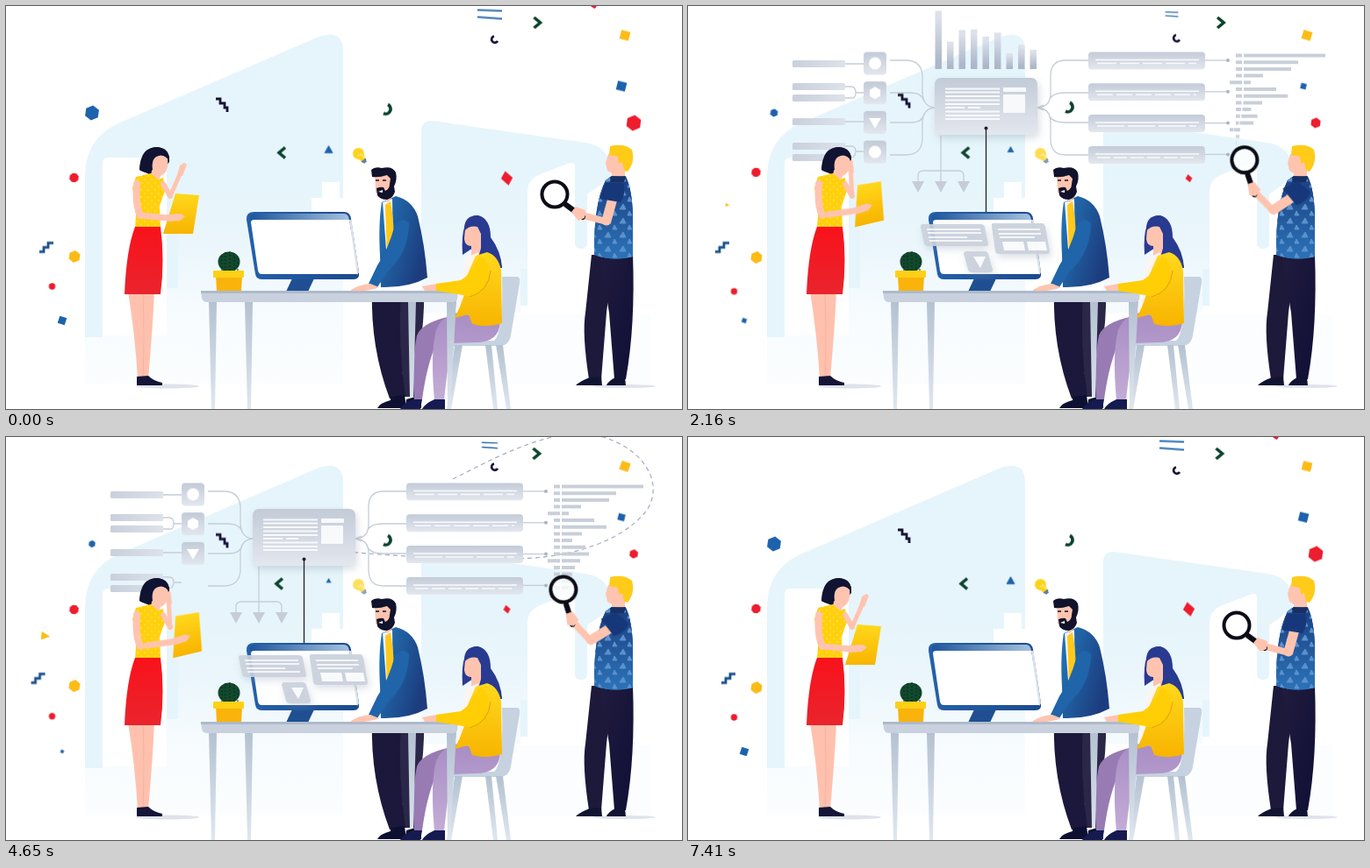
An HTML page for the animation above (7.44 s loop, 770 by 460 pixels).

```html
<!DOCTYPE html>
<html lang="en">
<head>
<meta charset="utf-8">
<title>Team at work</title>
<style>
html,body{margin:0;width:100%;height:100%;overflow:hidden;background:#fff}
svg{display:block;width:770px;height:460px}
.link{fill:none;stroke:#c6cdd8;stroke-width:1.3}
.skin{fill:#ffc4b0}
.limb{fill:none;stroke:#ffc4b0;stroke-linecap:round;stroke-linejoin:round}
.mark{fill:none;stroke-linejoin:miter}
[data-on]{transform-box:fill-box;transform-origin:center}
[data-on$=wide]{transform-origin:left}
[data-on$=tall]{transform-origin:top}
[data-on$=rise]{transform-origin:bottom}
.bar{transform-origin:0 72px}
#plane{offset-path:path("M509 48C560 22 630 -16 680 0C732 16 750 58 728 86C700 120 640 140 570 139C500 139 450 136 400 132C300 126 130 170 90 212C40 265 40 345 88 380C120 400 160 430 205 434C240 436 265 444 330 466L380 490");animation:fly 7440ms linear infinite}
@keyframes fly{0%,52.5%{offset-distance:0%;opacity:0}52.6%{opacity:1}73.6%{offset-distance:100%;opacity:1}73.7%,100%{offset-distance:100%;opacity:0}}
#reveal{stroke-dasharray:1 2;animation:draw 7440ms linear infinite}
@keyframes draw{0%,52.5%{stroke-dashoffset:1}73.6%,100%{stroke-dashoffset:0}}
#trail{animation:fade 7440ms linear infinite}
@keyframes fade{0%,52.5%{opacity:0}52.6%,75.5%{opacity:1}79.5%,100%{opacity:0}}
</style>
</head>
<body>
<svg viewBox="0 0 770 460" xmlns="http://www.w3.org/2000/svg">
<defs>
  <linearGradient id="wall" gradientUnits="userSpaceOnUse" x2="0" y1="200" y2="432"><stop stop-color="#e6f5fb"/><stop offset=".3" stop-color="#eaf6fc"/><stop offset=".7" stop-color="#f8fcfe"/><stop offset="1" stop-color="#fbfdfe"/></linearGradient>
  <linearGradient id="steel" x2="0" y2="1"><stop stop-color="#c3cbd8"/><stop offset="1" stop-color="#e3e7ee"/></linearGradient>
  <linearGradient id="pale" x2="1" y2="0"><stop stop-color="#c9d0dc"/><stop offset="1" stop-color="#dde2ea"/></linearGradient>
  <linearGradient id="col" x2="0" y2="1"><stop stop-color="#e3e7ee"/><stop offset="1" stop-color="#a6b1c5"/></linearGradient>
  <linearGradient id="leg" x2="0" y2="1"><stop stop-color="#b4c1d1"/><stop offset="1" stop-color="#dfe7ef"/></linearGradient>
  <linearGradient id="screen" x2="1" y2="0"><stop stop-color="#2461ab"/><stop offset="1" stop-color="#1c4a8c"/></linearGradient>
  <linearGradient id="glow" x2="1" y2="0"><stop stop-color="#1f559c"/><stop offset="1" stop-color="#a5c2df"/></linearGradient>
  <linearGradient id="coat" x2="1" y2=".5"><stop stop-color="#2377b8"/><stop offset="1" stop-color="#1c3c7e"/></linearGradient>
  <linearGradient id="gold" x2="0" y2="1"><stop stop-color="#ffd81c"/><stop offset="1" stop-color="#f8b400"/></linearGradient>
  <linearGradient id="red" x2="0" y2="1"><stop stop-color="#f9121b"/><stop offset="1" stop-color="#e9242d"/></linearGradient>
  <linearGradient id="navy" x2="1" y2="1"><stop stop-color="#201c3e"/><stop offset="1" stop-color="#100f36"/></linearGradient>
  <linearGradient id="plum" x2="0" y2="1"><stop stop-color="#a98dc4"/><stop offset="1" stop-color="#c2add6"/></linearGradient>
  <linearGradient id="shirt" x2="0" y2="1"><stop stop-color="#1b3f80"/><stop offset="1" stop-color="#2c73b8"/></linearGradient>
  <pattern id="dots" width="8" height="8" patternUnits="userSpaceOnUse"><rect width="8" height="8" fill="#ffd00c"/><circle cx="2" cy="2" r=".7" fill="#ffea90"/><circle cx="6" cy="6" r=".7" fill="#ffea90"/></pattern>
  <pattern id="tris" width="17" height="16" patternUnits="userSpaceOnUse"><path d="M2 8L6 2L9 8ZM11 15L13 10L16 15Z" fill="#5a92cd" stroke="#5a92cd" stroke-linejoin="round"/></pattern>
  <filter id="soft" x="-20%" y="-20%" width="140%" height="150%"><feDropShadow dy="4" stdDeviation="4" flood-color="#7f8da5" flood-opacity=".3"/></filter>
  <mask id="cut" maskUnits="userSpaceOnUse" x="0" y="-20" width="770" height="500"><path id="reveal" class="route" pathLength="1" fill="none" stroke="#fff" stroke-width="8"/></mask>
</defs>
<rect width="770" height="460" fill="#fff"/>

<!-- buildings and paper plane -->
<path d="M473 350V143Q473 130 486 131L660 156Q690 160 690 195L662 215V270Q662 277 655 277T648 270V184Q648 177 640 180L606 193Q594 199 594 212V342H586V350Z" fill="url(#wall)"/>
<path d="M586 300H594V342H586ZM648 215H662V270Q662 277 655 277T648 270Z" fill="#e6f5fb"/>
<path d="M574 352H735V432H574Z" fill="#fbfdfe"/>
<g mask="url(#cut)"><path id="trail" class="route" fill="none" stroke="#a9b1c6" stroke-width="1.3" stroke-dasharray="5 4"/></g>
<g id="plane"><path d="M-7 -11L32 5L-6 4Z" fill="#dde3ec"/><path d="M-2 4L32 5L6 13Z" fill="#e8edf3"/><path d="M-2 4L1 13L8 7L32 5Z" fill="#b7c1d0"/></g>
<path d="M90 432V195Q90 150 130 133L354 36Q384 25 384 52V432Z" fill="url(#wall)"/>
<path d="M110 376V180Q110 173 117 173H175Q183 173 183 181V376Z" fill="#fff"/>
<path d="M90 195H110V378H90ZM183 181H196V322H183Z" fill="#e6f5fb"/>
<path d="M348 236V219H360V201H380V219H385V236Z" fill="#fff"/>
<g data-on="1550 5450 fade" fill="url(#pale)" id="leftbars"><path class="link" d="M179 66H200M179 92H186Q191 92 191 99T186 105H179M191 99H200M179 132H200M179 160H186Q191 160 191 166T186 173H179M191 166H200"/></g>

<!-- desk equipment -->
<path d="M326 311H351L344 326H319Z" fill="#1f4f92"/>
<path d="M283 235H385Q392 235 393 243L402 304Q403 312 396 312H292Q285 312 284 306L274 244Q273 235 283 235Z" fill="url(#screen)"/>
<path d="M283 237H385Q390 237 391 244H278Q277 237 283 237Z" fill="url(#glow)"/>
<path d="M283 244H391L401 304Q401 306 398 306H291Q288 306 287 302L279 247Q279 244 283 244Z" fill="#fff"/>
<path d="M391 244H393.500L402 304L400 307Z" fill="#dce2ec"/>
<ellipse cx="254" cy="292" rx="12.500" ry="11.500" fill="#12492d"/>
<path d="M246 285V302M250 281V302M255 280V302M260 282V302M264 288V302" stroke="#06291c" stroke-dasharray="2 2"/>
<path d="M239 307H269L268 326H240Z" fill="#f9b30b"/><rect x="236" y="302" width="35" height="8" rx="1" fill="#ffd016"/>

<!-- standing man at the desk -->
<path d="M443 325H476Q477 362 470 396L466 446H454L443 338Z" fill="#2b2748"/>
<path d="M417 325H450Q446 385 455 446L437 448Q415 390 417 325Z" fill="#1b183b"/>
<path d="M423 459Q426 453 438 450L438 446L454 444L456 459ZM455 459L456 449L466 446L473 455V459Z" fill="#0d1030"/>
<path d="M428 224L444 217Q463 222 469 240Q477 272 480 310Q458 322 427 321L426 285Q424 248 428 224Z" fill="url(#coat)"/>
<path d="M429 224L440 220L441 275L434 292Z" fill="#f2f5fb"/><path d="M432 227L438 223Q444 260 440 275L434 287Z" fill="#ffc91b"/>
<path class="skin" d="M420 190H441V217L435 224L428 217L421 213Z"/>
<path d="M417 195L416 187Q420 183 428 185Q440 182 444 190Q446 198 442 206L443 212Q441 219 434 221Q426 221 423 216L422 208Q427 206 430 207L432 211Q437 209 437 203L438 197L434 193Q425 196 417 195Z" fill="#11122b"/>
<path d="M424 212L429 210L429 213Z" fill="#fff"/>
<path d="M421 199H425M429 199H433" stroke="#11122b" stroke-width="1.300"/>

<!-- chair and seated legs -->
<path d="M565 309H582Q586 309 585 316L575 376Q573 388 562 388H510V382H556Q567 372 565 309Z" fill="#c6d2e0"/>
<path d="M511 387H520L507 460H502ZM546 387H553L560 460H555ZM558 387H566L575 460H570Z" fill="url(#leg)"/>
<path d="M520 352Q475 358 468 376Q462 405 465 449H474Q480 405 492 382L530 375Z" fill="#977bb2"/>
<path d="M515 350L563 360Q562 384 535 384L508 385Q503 410 499 450H488Q483 395 490 370Q496 354 515 350Z" fill="url(#plum)"/>
<path d="M449 460Q452 454 464 449H474L472 460ZM474 460Q477 454 488 449H500V460Z" fill="#151b50"/>

<!-- table -->
<path d="M231 337H240L238 460H234ZM272 337H281L279 460H275ZM458 337H467L464 446H460ZM502 337H513L506 460H503Z" fill="url(#leg)"/>
<path d="M222 325H515L514 335Q513 338 509 338H229Q224 338 223 333Z" fill="#c8d1dd"/><path d="M222 325H515V328H222Z" fill="#adbaca"/>
<path d="M443 250Q451 239 459 248Q459 281 434 304L423 321L413 317L423 296Q435 279 443 250Z" fill="#2064aa"/>
<path d="M393 324Q402 318 415 317L425 321Q415 326 393 325Z" class="skin"/>

<!-- seated woman -->
<path d="M520 284Q517 238 538 239Q552 243 552 264Q564 280 565 299L545 300L535 274Z" fill="#293a91"/>
<path class="skin" d="M523 254Q530 246 541 252L542 273L538 287L530 286L530 274Q523 274 522 266Z"/>
<path d="M537 239Q554 247 551 270Q563 284 565 299L548 297L541 276V260L537 252Q528 250 522 257Q521 239 537 239Z" fill="#293a91"/>
<path d="M523 288L538 281L534 330L512 349Z" fill="#fbf5f2"/>
<path d="M535 285L548 281Q561 285 564 302L565 362Q549 368 531 363L527 352L511 356Q524 332 526 306Z" fill="url(#gold)"/>
<path d="M540 286Q552 291 548 309Q542 331 527 331L490 325L490 317L518 313Q529 307 540 286Z" fill="#ffce05"/>
<path d="M552 302Q550 326 528 332" fill="none" stroke="#e4a100"/>
<path class="skin" d="M474 320L490 317V325L477 325Z"/>

<!-- woman with clipboard -->
<ellipse cx="184" cy="434" rx="36" ry="2.500" fill="#dfe2eb"/>
<path d="M139 326H169Q167 370 162 425H150Q147 375 139 326Z" fill="#ffc1ad"/><path d="M156 328Q158 380 156 424" fill="none" stroke="#f3b3a2"/>
<path d="M149 433V423L162 422Q168 428 178 430V433Z" fill="#151537"/>
<path d="M152 187Q155 161 172 161Q187 162 186 178L178 188L163 192Z" fill="#111333"/>
<path class="skin" d="M164 174Q174 165 184 174Q186 190 176 194L174 199L164 198L166 188Z"/>
<path d="M152 187Q153 161 172 161Q187 163 186 177Q181 169 174 171Q165 173 167 187Q160 193 152 187Z" fill="#111333"/>
<path d="M148 195L165 191L173 198L179 196L181 211L175 228L176 253H147L149 226L144 208Z" fill="url(#dots)"/>
<path d="M147 252H176Q181 290 176 329H135Q137 278 147 252Z" fill="url(#red)"/>
<path class="limb" d="M179 203L187 217" stroke-width="6"/>
<g id="wave"><path class="limb" d="M187 217L198 192" stroke-width="5"/><path class="skin" d="M195 193L198 182L203 179L206 181L201 194Z"/></g>
<path class="limb" d="M149 203Q147 227 153 239" stroke-width="8"/>
<g id="folder"><path class="limb" d="M153 239L185 242" stroke-width="7"/><path d="M193 214L220 216L213 260L179 260Z" fill="url(#gold)"/><path class="skin" d="M183 238L199 237L204 240L198 245L183 246Z"/></g>

<!-- diagram -->
<g class="link" data-on="750 6200 fade"><path d="M230 62H248Q266 62 267 80V99Q268 115 281 116Q268 117 267 132V152Q266 170 248 170H230M230 99H252Q267 99 269 109M230 133H254Q267 133 269 123"/></g>
<g class="link" data-on="750 5650 fade"><path d="M456 62H430Q413 62 413 80V100Q413 115 398 116Q413 117 413 133V152Q413 170 430 170H456M456 99H430Q413 99 411 109M456 133H430Q413 133 411 123"/></g>
<path class="link" data-on="750 6200 fade" d="M405 113L398 116L405 119"/>
<g id="icons"></g><g id="rows"></g><g id="chart"></g><g id="list"></g>
<g data-on="1650 5500 tall"><path class="link" d="M288 148V201M262 201V194Q262 188 268 188H308Q314 188 314 194V201"/><path d="M255 200H269L262 213ZM281 200H295L288 213ZM307 200H321L314 213Z" fill="#c6cdd8"/></g>
<g data-on="500 6350 pop"><g filter="url(#soft)"><rect x="281" y="82" width="117" height="65" rx="7" fill="url(#steel)"/></g>
<path d="M293 94.500H355M293 98.500H355M293 103H355M293 107.500H355M293 112H355M293 116H315M319 116H333M293 120.500H355M293 125H355M293 129H355" stroke="#f7f9fb" stroke-width="1.800"/>
<rect x="359" y="93" width="26" height="5" rx="1" fill="#f7f9fb"/><rect x="359" y="101" width="25" height="21" rx="1" fill="#f7f9fb"/></g>
<g data-on="350 6600 rise"><path d="M339.500 139V235" stroke="#20202a" stroke-width="1.300"/><circle cx="339.500" cy="139.500" r="2" fill="#20202a"/></g>
<g data-on="130 6800 pop"><g fill="#cad1dc" fill-opacity=".9" filter="url(#soft)">
<path d="M267 249H333Q337 249 338 252L342 272Q342 274 339 274H274Q270 274 269 271L265 252Q265 249 267 249Z"/>
<path d="M348 248H403Q406 248 407 252L412 280Q412 283 409 283H354Q351 283 350 280L346 252Q345 248 348 248Z"/>
<path d="M317 280H338Q341 280 342 283L347 301Q347 304 344 304H323Q320 304 319 301L314 283Q314 280 317 280Z"/></g>
<path d="M272 255H333M273 259H334M274 264H318M275 268H335M353 255H401M354 260H402M355 264H395" stroke="#fff" stroke-width="1.600"/><path d="M358 269H382L384 279H360ZM386 269H407L409 279H388ZM325 286H339L333 299Z" fill="#f8fafc"/></g>

<!-- man with magnifier -->
<ellipse cx="704" cy="434" rx="36" ry="2" fill="#dfe2eb"/>
<path d="M667 284H692L684 350L678 426H664Q656 374 660 350Z" fill="#1c193b"/><path d="M676 284H714Q717 365 706 426H693L687 350Z" fill="url(#navy)"/>
<path d="M649 433Q654 428 665 424L678 423L679 433ZM684 433Q686 428 694 424H705L706 433Z" fill="#111333"/>
<path class="skin" d="M686 169L705 168V197L690 197L690 191L685 188L683 179Z"/>
<path d="M687 170L688 160Q704 156 713 164Q717 178 708 189L704 188L702 178L698 180L697 172Z" fill="#ffcb19"/>
<g id="torso"><path id="vest" d="M683 199L690 194L706 195Q713 209 714 238V286Q692 292 670 284Q669 227 683 199Z" fill="url(#shirt)"/><use href="#vest" style="fill:url(#tris)"/></g>
<path d="M683 199L690 194L706 195Q713 209 714 238V286Q692 292 670 284Q669 227 683 199Z" fill="url(#tris)"/>
<path d="M689 195L706 194L704 201L688 201Z" fill="#193064"/>
<g id="arm"><path class="limb" d="M692 216L684 245" stroke-width="11"/>
<g id="fore"><path class="limb" d="M684 246L653 238" stroke-width="8"/>
<g id="lens"><path d="M657 241L638 227" stroke="#0c0c16" stroke-width="6" stroke-linecap="round"/><circle cx="625" cy="215" r="14.500" fill="#fff" fill-opacity=".75" stroke="#0c0c16" stroke-width="4"/></g>
<path class="skin" d="M644 235L649 229L660 233L659 242L652 245Z"/></g>
<path d="M683 202L703 202Q707 213 700 224L676 220Z" fill="#16387a"/></g>
<g id="bits"></g>
</svg>
<script>
const T = 7440, beats = [0, 1380, 2760, 3960, 5370, 6030, T];
const $ = id => document.getElementById(id);
let css = '', count = 0;

// Register one keyframed cycle from [ms, declaration] stops.
function loop(el, stops, ease = 'ease-in-out') {
  const name = 'k' + count++;
  css += `@keyframes ${name}{${stops.map(([ms, rule]) => `${ms / T * 100}%{${rule}}`).join('')}}`;
  el.style.animation = `${name} ${T}ms ${ease} infinite`;
}
function add(parent, markup) {
  parent.insertAdjacentHTML('beforeend', markup);
  return parent.lastElementChild;
}
const move = v => 'transform:' + v;

const route = getComputedStyle($('plane')).offsetPath.match(/"(.*)"/)[1];
document.querySelectorAll('.route').forEach(p => p.setAttribute('d', route));

// Diagram parts
[66, 92, 105, 132, 160, 173].forEach(y =>
  add($('leftbars'), `<rect x="119" y="${y - 4}" width="60" height="8" rx="1.500"/>`));

const disc = '<circle r="7" fill="#fff"/>';
[disc, poly(6, 7, '#fff', 0), '<path d="M-7 -5H7L0 7Z" fill="#fff"/>', disc].forEach((face, i) => {
  const out = [5850, 5880, 5930, 3620][i];
  add($('icons'), `<g transform="translate(213 ${65.5 + i * 33.7})"><g data-on="${800 + i * 70} ${out} pop">
    <rect x="-13" y="-13" width="26" height="26" rx="4" fill="url(#steel)"/>${face}</g></g>`);
});
for (let i = 0; i < 4; i++) {
  const y = 52.5 + i * 35.8;
  add($('rows'), `<g data-on="${850 + i * 60} ${5550 + i * 30} wide"><rect x="456" y="${y}" width="133" height="20" rx="4" fill="url(#steel)"/>
    <path d="M464 ${y + 9}H582" stroke="#f8fafc" stroke-width="1.500"/>
    <path d="M466 ${y + 13}H579" stroke="#f8fafc" stroke-width="1.500" stroke-dasharray="${[22, 18, 31, 15][i]} 4"/></g>`);
  add($('rows'), `<g data-on="1500 5430 wide"><path class="link" d="M589 ${y + 9.5}H615"/><circle cx="615" cy="${y + 9.5}" r="2" fill="#aab4c3"/></g>`);
}
const lengths = [93, 62, 54, 22, 8, 37, 51, 23, 12, 27, 31, 21, 15, 12, 13, 8];
lengths.forEach((w, i) => {
  const y = 54.5 + i * 7.7, x = i % 7 === 4 ? 617 : 624;
  add($('list'), `<path data-on="${1650 + i * 35} ${5420 + i * 12} wide" d="M${x} ${y}h${631 - x}v4h${x - 631}ZM633 ${y}h${w}v4h${-w}Z" fill="#c9cfd9"/>`);
});
const low = [64, 27, 36, 25, 42, 25, 15, 18, 11];
const high = [68, 34, 50, 58, 34, 52, 20, 34, 29];
const last = [26, 13, 9, 13, 14, 9, 6, 6, 5];
low.forEach((h, i) => {
  const bar = add($('chart'), `<rect class="bar" x="${281.5 + i * 13.5}" y="71" width="7.500" height="1" fill="url(#col)"/>`);
  const size = v => move(`scaleY(${v})`);
  loop(bar, [[0, size(0)], [850, size(0)], [1380, size(h)], [2760, size(high[i])],
    [3400, size(high[i])], [3960, size(last[i])], [4200, size(0)], [T, size(0)]]);
});

// Timed entrances and exits
const kinds = {
  fade: v => 'opacity:' + v, pop: v => move(`scale(${v})`), wide: v => move(`scaleX(${v})`),
  tall: v => move(`scaleY(${v})`), rise: v => move(`scaleY(${v})`)
};
document.querySelectorAll('[data-on]').forEach(el => {
  const [start, end, kind] = el.dataset.on.split(' '), at = kinds[kind];
  loop(el, [[0, at(0)], [+start, at(0)], [+start + 320, at(1)], [+end, at(1)], [+end + 300, at(0)], [T, at(0)]]);
});

// Limbs
function pivot(id, x, y, stops) {
  $(id).style.transformOrigin = `${x}px ${y}px`;
  loop($(id), stops.map(([ms, v]) => [ms, move(v)]));
}
const lift = deg => {
  const r = k => `rotate(${deg * k}deg)`;
  return [[0, r(0)], [1650, r(0)], [2250, r(1)], [5180, r(1)], [5370, r(.66)], [5700, r(0)], [T, r(0)]];
};
pivot('arm', 692, 216, lift(43));
pivot('fore', 684, 246, lift(-10.5));
pivot('lens', 651, 237, lift(4));
pivot('wave', 187, 217, [[0, 'rotate(0deg)'], [250, 'rotate(0deg)'], [700, 'rotate(-27deg)'],
  [6700, 'rotate(-27deg)'], [7250, 'rotate(0deg)'], [T, 'rotate(0deg)']]);
const hold = k => `translate(${7 * k}px,${-k}px) rotate(${-13 * k}deg)`;
pivot('folder', 153, 240, [[0, hold(0)], [300, hold(0)], [900, hold(.9)], [1380, hold(.9)], [2760, hold(1.1)],
  [3960, hold(1.1)], [5100, hold(1)], [5370, hold(.4)], [5700, hold(0)], [T, hold(0)]]);

// Floating shapes
function poly(n, r, fill, tilt = 8) {
  const pts = Array.from({length: n}, (_, i) => {
    const a = (i + .5) * 2 * Math.PI / n + tilt * Math.PI / 180;
    return `${(r * Math.cos(a)).toFixed(1)},${(r * Math.sin(a)).toFixed(1)}`;
  });
  return `<polygon points="${pts.join(' ')}" fill="${fill}"/>`;
}
const line = (d, color, w) => `<path class="mark" d="${d}" stroke="${color}" stroke-width="${w}"/>`;
const ways = {
  size: v => move(`scale(${v})`), x: v => move(`translateX(${v}px)`), y: v => move(`translateY(${v}px)`),
  turn: v => move(`rotate(${v}deg)`), fade: v => 'opacity:' + v,
  slip: v => move(`translate(${-v * .6}px,${v}px)`)
};
function bit(art, x, y, way, values, times = beats) {
  const el = add($('bits'), `<g transform="translate(${x} ${y})"><g>${art}</g></g>`).firstElementChild;
  loop(el, times.map((ms, i) => [ms, ways[way](values[i % values.length])]));
}
const blue = '#1d62ad', red = '#ed1c2e', yellow = '#fdbb16', ink = '#171338', green = '#0b432c';
const steps = 'M-8 5H-3V0H2V-5H8';
bit(poly(6, 8.5, blue), 98, 122, 'size', [1, .13, .82, 0, 1, .42]);
bit(`<path d="M-5 -6L6 1L-6 5Z" fill="${yellow}"/>`, 45, 227, 'size', [0, 1, 0, .75, 1, .65]);
bit(poly(8, 5.5, red), 77.5, 196, 'y', [0, 11, -17, 1, 1, -15]);
bit(poly(6, 7, yellow), 78, 286, 'y', [0, -7, 6, 0, -4, 5]);
bit(`<circle r="3.700" fill="${red}"/>`, 52.5, 320, 'y', [0, 10, 3, -9, 7, -9]);
bit(poly(4, 6, blue, 18), 64, 359, 'size', [1, .15, .9, .6, .25, 0]);
bit(line(steps, '#1b508e', 2.8), 46, 275.5, 'x', [0, -9, -11, -2, 0, -3, -11, -8, 0, 0],
  [0, 1380, 1650, 2760, 3300, 3960, 4950, 5370, 6030, T]);
bit(line('M-7 -6H-2V-1H3V4H6V9', ink, 2.8), 246, 112, 'y', [0, -2, -6, 5, 6, 4]);
bit(line('M4 -6L-3 0L4 6', green, 3.6), 314, 167.5, 'x', [0, -10, 10, -6, 0, 10]);
bit(line('M-4 -6L3 0L-4 6', green, 3.6), 605.5, 19, 'x', [0, -7, 7, -2, 0, 8]);
bit(`<path d="M0 -5L5 4H-5Z" fill="${blue}" stroke="${blue}"/>`, 367.5, 164, 'size', [.9, .2, 1, .55, .5, 1]);
bit(line('M1 -5A5 5 0 1 1 -4 5', green, 3.7), 434, 117.5, 'y', [0, 5, -7, 0, 0, -6]);
bit(line('M0 -3.5A3.7 3.7 0 1 0 4 2', ink, 2.7), 556, 38, 'y', [0, -7, 2, -4, -4, 2]);
bit(line('M-14 -5L14 -4M-14 3L14 5', '#286ab0', 2.2), 551, 9.5, 'size', [1, .35, .64, .62, .68, .34]);
bit(`<rect x="-9" y="-4" width="18" height="8" rx="1" transform="rotate(33)" fill="${red}"/>`, 660, 4, 'slip', [-9, 0, -20, -20, -9, -9]);
bit(poly(4, 7.4, yellow, 14), 705, 33.5, 'turn', [0, 20, -8, -8, 20, 20]);
bit(poly(4, 7.4, blue, 14), 701, 91.5, 'size', [1, .33, .8, .65, .85, .55]);
bit(poly(6, 9, red), 715, 133.5, 'size', [1, .32, .9, .72, .45, .68]);
bit(`<path d="M-2 -9L7 -1L2 8L-7 0Z" fill="${red}"/>`, 570.5, 197, 'size', [.95, .28, .72, .65, .5, 1.1]);
bit(`<g transform="rotate(-38)"><circle r="6.500" fill="#ffd21a"/><path d="M-4 4H4L3 9H-3Z" fill="#ffd21a"/>
  <path d="M-3 10H3M-2 12H2" stroke="#295584" stroke-width="1.500"/><path d="M-2 1L0 3L2 1V8" stroke="#fff4a9" fill="none"/></g>`,
  401.5, 168.5, 'fade', [1, .4, 1, 1, .4, 1]);

document.head.appendChild(document.createElement('style')).textContent = css;
</script>
</body>
</html>
```
